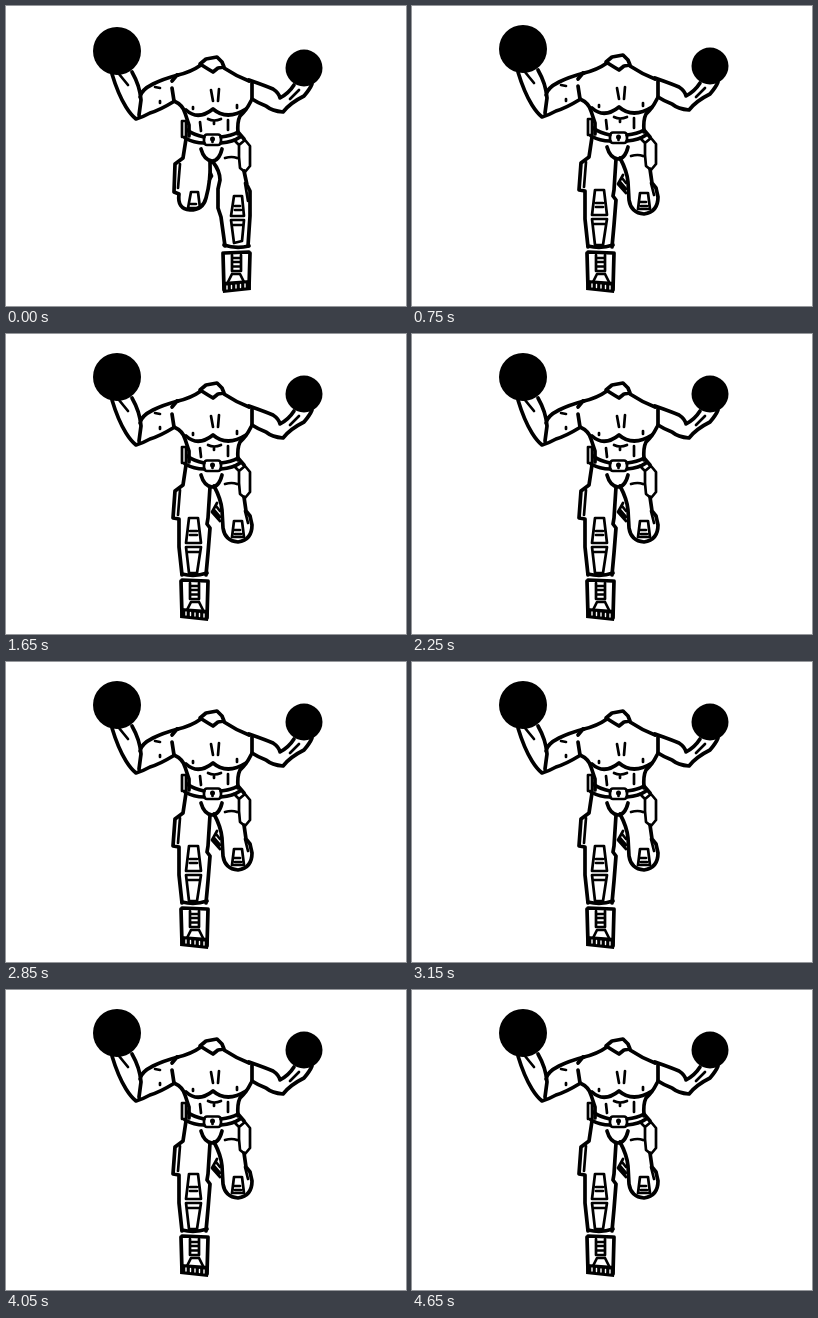
These frames come from a looping animation (400x300 px, 4800 ms). An HTML page:

```html
<!DOCTYPE html>
<html lang="en">
<head>
<meta charset="utf-8">
<title>Marching figure</title>
<style>
  html, body { margin: 0; width: 100%; height: 100%; overflow: hidden; background: #fff; }
  svg { display: block; width: 100vw; height: 100vh; }
  .line { fill: none; stroke: #000; stroke-width: 3.7; stroke-linecap: round; stroke-linejoin: round; }
  .thin { stroke-width: 2.7; }
  .solid { fill: #000; stroke: none; }
</style>
</head>
<body>
<svg viewBox="0 0 400 300">
  <defs>
    <g id="boot">
      <path d="M218 239Q230 243 243 240M218 247L243 246M217 247L218 284M244 247L243 282"/>
      <path class="thin" d="M226 249V265M235 249V265M226 252H235M226 256H235M226 260.500H235M226 265H235M226 268L222 276M226 268H234L238 276"/>
      <path class="solid" d="M216 276L244 274L245 284L217 287Z"/>
      <path d="M221 280V283M225.500 279.500V282.500M230 279V282M234.500 278.500V281.500M239 278V281" stroke="#fff" stroke-width="1.400"/>
    </g>
  </defs>

  <g class="line">
    <g id="body">
      <!-- neck and shoulders -->
      <path d="M194 58L200 53L211 51L216 56L218 61L212 62L207 66L202 63Z"/>
      <path d="M195 59Q185 66 172 69M218 62Q230 70 243 75"/>
      <!-- arms -->
      <path d="M172 69Q157 73 147 78Q135 84 134 91M106 68Q112 88 120 101Q125 109 130 113Q137 111 144 107Q154 104 167 96M126 66Q134 80 135 94L133 109"/>
      <path d="M243 74Q260 80 267 83Q273 87 274 92Q283 87 288 79M246 93Q252 97 260 100Q266 105 277 106Q284 97 298 90Q304 83 306 78"/>
      <path class="thin" d="M113 68L122 79M149 81L154 82M154 95V97M284 93L293 84"/>
      <path d="M166 82L168 95M171 69L166 75M246 77V93"/>
      <!-- torso -->
      <path d="M168 95Q177 99 179 107L183 119V130M245 95Q240 105 234 110Q231 116 232 128"/>
      <path d="M180 104Q192 115 207 103Q221 115 240 103"/>
      <path class="thin" d="M205 84L207 95M213 83L212 95M202 113Q208 116 215 113M208 115V118M194 116L195 125M222 114V124M187 101V103M231 99V102"/>
      <!-- belt and pouches -->
      <rect class="thin" x="198" y="128.500" width="17" height="10.500" rx="3"/>
      <circle class="solid" cx="206.500" cy="133" r="2.500"/>
      <path class="thin" d="M206.500 133V136M176 115H180V131H176Z"/>
      <path d="M181 124Q188 129 198 131M179 132Q188 137 198 137M215 131Q225 130 232 126M215 137Q227 136 234 131M232 126L238 133"/>
      <path class="thin" d="M228 134L233 139L239 134L244 140V160L239 166L234 162L233 151V139M219 152Q226 150 231 152"/>
      <path d="M195 143Q198 154 206 155Q213 155 216 143"/>
      <circle class="solid" cx="111" cy="45" r="24"/>
      <circle class="solid" cx="298" cy="62" r="18.500"/>
    </g>

    <g id="rightDown">
      <path d="M180 133L177 152L169 158L168 186L173 188Q171 203 184 204Q197 204 200 192Q205 174 204 156M207 156Q214 165 214 174L212 183V202L215 211L219 240M238 165L241 179L244 185V210L242 240"/>
      <path class="thin" d="M174 158L172 182M185 186H192L194 202H182ZM185 198H190M204 165L206 170L203 175"/>
      <path class="thin" d="M239 177L242 195M228 190H236L238 210H225ZM229 200H234M229 204H235M225 214H238L236 235L228 237ZM226 219H237"/>
      <use href="#boot"/>
    </g>

    <g id="leftDown">
      <path d="M180 131L177 151L169 157L167 184L173 185V213L176 241M204 153L202 184L201 190L204 194L202 219L200 241M208 152Q215 165 216 176L217 194Q219 207 232 208Q246 206 246 191L244 182L240 177L238 163"/>
      <path class="thin" d="M174 156L172 181M183 184H192L195 209H180ZM184 197H191M184 201H191M180 213H195L191 239H183ZM181 218H194"/>
      <path class="thin" d="M239 177L242 189M228 187H236L238 203H226ZM229 196H234M229 200H235M211 169L206 178L214 187M208 176L214 183M210 172L214 177"/>
      <use href="#boot" transform="translate(419 0) scale(-1 1)"/>
    </g>
  </g>
</svg>
<script>
  const STEP = 150, LOOP = 4800;
  const [body, rightDown, leftDown] = ["body", "rightDown", "leftDown"].map(id => document.getElementById(id));
  const start = performance.now();

  function draw(now) {
    const time = Math.max(0, now - start) % LOOP;
    const lifted = Math.floor(time / STEP) % 2 === 1;
    body.setAttribute("transform", `translate(0 ${lifted ? -2 : 0})`);
    rightDown.style.display = lifted ? "none" : "";
    leftDown.style.display = lifted ? "" : "none";
    requestAnimationFrame(draw);
  }
  draw(start);
</script>
</body>
</html>
```
